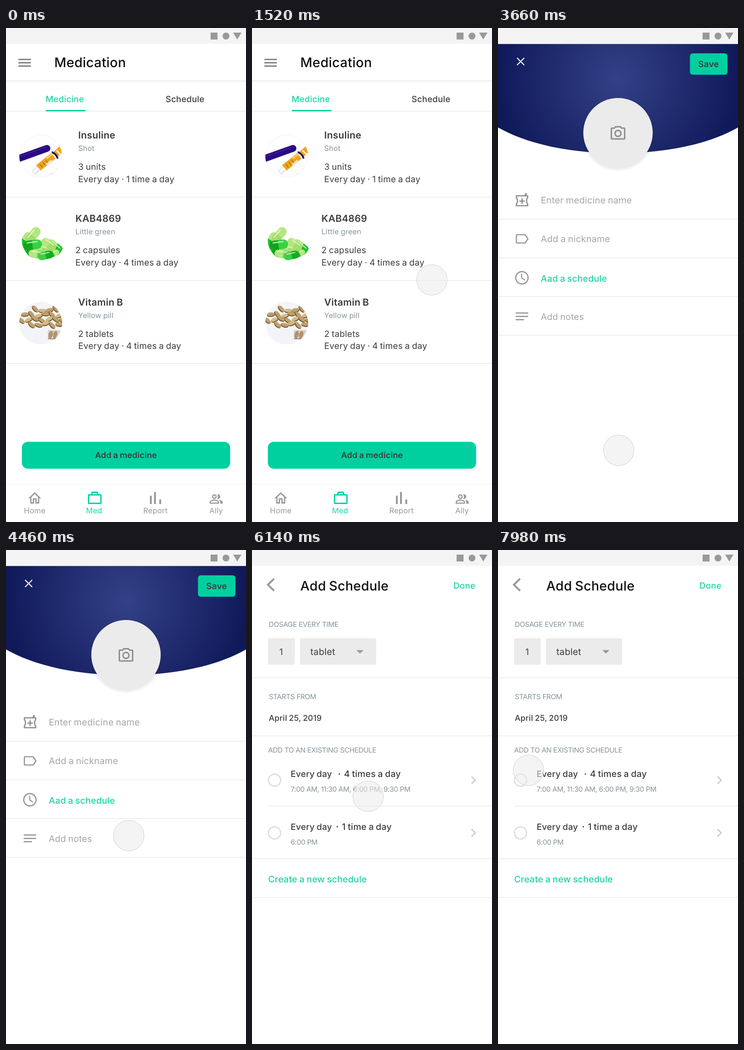
These frames come from a looping animation (522 by 1073 pixels, 8 s). An HTML page:

```html
<!DOCTYPE html>
<html lang="en">
<head>
<meta charset="utf-8">
<title>Medication</title>
<style>
  html, body { margin: 0; width: 100%; height: 100%; overflow: hidden; background: #fff; }
  svg { display: block; width: 522px; height: 1073px; }
  text {
    font-family: Inter, sans-serif; font-optical-sizing: none; text-rendering: geometricPrecision;
    letter-spacing: .012em; word-spacing: -.05em; white-space: pre;
  }
  .tight { letter-spacing: -.024em; word-spacing: 0; }
</style>
</head>
<body>
<svg id="stage" viewBox="0 0 522 1073"></svg>
<script>
const GREEN = '#00d0a0', TEAL = '#1bd3a6', INK = '#3c3c3e', SLATE = '#87939a', GREY = '#999', PALE = '#a5a5a5';

// Drawing helpers
const text = (x, y, size, str, fill = INK, weight = 400, extra = '') =>
  `<text x="${x}" y="${y}" font-size="${size}" fill="${fill}" font-weight="${weight}" ${extra}>${str}</text>`;
const middle = (x, y, size, str, fill, weight) => text(x, y, size, str, fill, weight, 'text-anchor="middle"');
const tight = (x, y, str) => text(x, y, 15.3, str, SLATE, 400, 'class="tight"');
const rect = (x, y, w, h, fill, r = 0) => `<rect x="${x}" y="${y}" width="${w}" height="${h}" rx="${r}" fill="${fill}"/>`;
const circle = (x, y, r, fill, extra = '') => `<circle cx="${x}" cy="${y}" r="${r}" fill="${fill}" ${extra}/>`;
const ring = (x, y, r, color, w) => circle(x, y, r, 'none', `stroke="${color}" stroke-width="${w}"`);
const stroke = (d, color, w, extra = '') => `<path d="${d}" fill="none" stroke="${color}" stroke-width="${w}" ${extra}/>`;
const fill = (d, color, extra = '') => `<path d="${d}" fill="${color}" ${extra}/>`;
const rule = (y, x = 0, color = '#e6e6e6') => rect(x, y - .6, 522 - x, 1.2, color);
const group = (id, body) => `<g id="${id}">${body}</g>`;
const clipped = (x, y, body) => {
  const id = `clip${y}`;
  return `<clipPath id="${id}"><circle cx="${x}" cy="${y}" r="46.5"/></clipPath><g clip-path="url(#${id})">${body}</g>`;
};

function penPicture() {
  return circle(75.5, 278.5, 46.5, '#fefefe') + ring(75.5, 278.5, 46, '#eee', .8) +
    stroke('M26 284L89 261.500', '#2a0a83', 15, 'stroke-linecap="round"') +
    stroke('M30 279L88 258', '#3d1f9c', 2) +
    stroke('M126 258L106 276', '#f2a516', 14) +
    stroke('M110 266l10 10', '#fff', 3) +
    stroke('M103 278L70 304', '#f2a516', 15) +
    stroke('M102 273L88 284', '#ffd25c', 3) +
    stroke('M101 270Q109 274 112 282', '#24106f', 4, 'stroke-linecap="round"') +
    stroke('M100 288L88 297', '#e9e4da', 5) +
    stroke('M74 296l5 7M80 291l5 7M86 286l5 7', '#9a6a12', 1.3) +
    stroke('M71 304L60 315', '#e4e4e8', 11) + stroke('M70 304L61 313', '#fff', 6) +
    stroke('M93 318l10-3M108 304l4 3', '#ddd', 1);
}

function capsulePicture() {
  const capsule = (x, y, angle, a, b, s = 1) =>
    `<g transform="translate(${x} ${y}) rotate(${angle}) scale(${s})">` +
    fill('M0-9H-9a9 9 0 0 0 0 18H0z', a) + fill('M0-9H9a9 9 0 0 1 0 18H0z', b) +
    stroke('M-10-5H9', '#e9ffe0', 2.5, 'stroke-linecap="round" opacity=".7"') + '</g>';
  const dark = '#19bf27', deep = '#10a51d', lime = '#b5e77f', leaf = '#a5dc6c';
  return capsule(43, 462, 120, lime, dark, 1.1) +
    capsule(59, 450, -50, leaf, lime, 1.1) +
    capsule(48, 480, 50, dark, deep, 1.1) +
    capsule(78, 481, 15, lime, leaf, 1.2) +
    capsule(106, 476, 40, lime, dark, 1.15) +
    capsule(93, 470, 35, lime, leaf) +
    capsule(67, 491, 8, lime, '#8bd95f') +
    capsule(104, 490, -25, dark, lime, .7) +
    capsule(58, 471, -8, deep, '#3bd042', 1.15) +
    capsule(86, 494, -12, '#3bd042', '#12ad20', .95);
}

function tabletPicture() {
  let body = circle(75.5, 641, 46.5, '#f3f4f7');
  for (let i = 0; i < 28; i++) {
    const row = Math.floor(i / 7), col = i % 7;
    const x = 34 + col * 15 + (row % 2) * 7, y = 612 + row * 10.5 + 2.5 * Math.sin(i * 2.3);
    if ((row === 0 && col < 2) || (row === 3 && (col < 1 || col > 5))) continue;
    const turn = `transform="translate(${x} ${y}) rotate(${12 + 38 * Math.sin(i * 4.1)})"`;
    body += `<g ${turn}><ellipse cy="1.8" rx="8.8" ry="4.2" fill="#75582f"/>` +
      `<ellipse rx="8.8" ry="3.8" fill="${i % 3 ? '#bfa06c' : '#d3ba8c'}"/></g>`;
  }
  return body + rect(91, 656, 27, 20, '#d9d4cf', 2) +
    [97, 107].map(x => `<ellipse cx="${x}" cy="666" rx="4.5" ry="8.5" transform="rotate(15 ${x} 666)" fill="#b3946a"/>`).join('') +
    stroke('M91 675H118', '#8c7250', 1.5);
}

function medicineRow(x, y, name, nick, dose, plan) {
  return text(x, y, 20.9, name, INK, 600) + text(x, y + 27, 16.1, nick, SLATE) +
    text(x, y + 68, 18.8, dose) + text(x, y + 94.5, 18.9, plan);
}

function listScreen() {
  const nav = (x, label, color) => middle(x, 1054, 16.5, label, color);
  return [68.3, 75.5, 82.7].map(y => rect(27, y - 1.4, 27, 2.8, '#7b7b7b')).join('') +
    text(105, 85, 28.7, 'Medication', '#111', 500) + rule(115.2, 0, '#dedede') +
    text(86, 161, 18.7, 'Medicine', TEAL, 500) + text(347, 161, 18.5, 'Schedule', INK, 500) +
    rule(180.6) + rect(86.5, 178, 86.5, 3, GREEN, 1.5) +
    clipped(75.5, 278.5, penPicture()) + clipped(81, 460, capsulePicture()) + clipped(75.5, 641, tabletPicture()) +
    medicineRow(157, 240, 'Insuline', 'Shot', '3 units', 'Every day · 1 time a day') +
    medicineRow(151, 421, 'KAB4869', 'Little green', '2 capsules', 'Every day · 4 times a day') +
    medicineRow(157, 602.5, 'Vitamin B', 'Yellow pill', '2 tablets', 'Every day · 4 times a day') +
    rule(367.4) + rule(548.5) + rule(728.5) +
    rect(34.5, 898.7, 453, 58.6, GREEN, 13) + middle(261, 933.5, 17.9, 'Add a medicine', INK, 600) +
    rule(991, 0, '#f0f0f0') +
    fill('M12 5.69l5 4.5V18h-2v-6H9v6H7v-7.81l5-4.5M12 3L2 12h3v8h6v-6h2v6h6v-8h3z', GREY, 'transform="translate(45.7 1004) scale(1.4 1.45)"') +
    stroke('M180.500 1014H205.500a1 1 0 0 1 1 1V1031.500a1 1 0 0 1-1 1H180.500a1 1 0 0 1-1-1V1015a1 1 0 0 1 1-1zM187 1014V1009.500a1 1 0 0 1 1-1H198a1 1 0 0 1 1 1V1014', GREEN, 2.8) +
    rect(313, 1016, 4, 18, GREY) + rect(322, 1008, 4, 26, GREY) + rect(333.5, 1024, 4, 10, GREY) +
    fill('M16.67 13.13C18.04 14.06 19 15.32 19 17v3h4v-3c0-2.18-3.57-3.47-6.33-3.87zM15 12c2.21 0 4-1.79 4-4s-1.79-4-4-4c-.47 0-.91.1-1.33.24C14.5 5.27 15 6.58 15 8s-.5 2.73-1.33 3.76c.42.14.86.24 1.33.24zM9 12c2.21 0 4-1.79 4-4s-1.79-4-4-4-4 1.79-4 4 1.79 4 4 4zm0-6c1.1 0 2 .9 2 2s-.9 2-2 2-2-.9-2-2 .9-2 2-2zm0 7c-2.67 0-8 1.34-8 4v3h16v-3c0-2.66-5.33-4-8-4zm6 5H3v-.99C3.2 16.29 6.3 15 9 15s5.8 1.29 6 2v1z', GREY, 'transform="translate(441.7 1007.6) scale(1.28)"') +
    nav(62.5, 'Home', GREY) + nav(191.5, 'Med', TEAL) + nav(325, 'Report', GREY) + nav(457, 'Ally', GREY);
}

function formScreen() {
  return `<radialGradient id="night" gradientUnits="userSpaceOnUse" cx="261" cy="110" r="260">
      <stop offset="0" stop-color="#334186"/><stop offset="1" stop-color="#101a5b"/></radialGradient>
    <radialGradient id="shade"><stop offset=".88" stop-color="#000" stop-opacity=".1"/><stop offset="1" stop-color="#000" stop-opacity="0"/></radialGradient>` +
    fill('M0 34.500H522V216C455 254 360 272 261 272S67 254 0 216z', 'url(#night)') +
    circle(261, 231, 81, 'url(#shade)') + circle(261, 227.5, 75.5, '#ebebeb') +
    stroke('M248 217.500H253L256 214.500H266L269 217.500H274a1.500 1.500 0 0 1 1.500 1.500V239.500a1.500 1.500 0 0 1-1.500 1.500H248a1.500 1.500 0 0 1-1.500-1.500V219a1.500 1.500 0 0 1 1.500-1.500z', '#8e8e8e', 3) +
    ring(261, 229, 6.5, '#8e8e8e', 3) +
    stroke('M41.500 65L57 80.500M57 65L41.500 80.500', '#fff', 2.2) +
    rect(417.5, 55, 81.5, 46.5, GREEN, 6) + middle(458, 85, 18.8, 'Save', INK, 600) +
    stroke('M40 364.500H64.500V368Q59.500 375 64.500 383V386H40V383Q45 375 40 368zM52.300 370V382M46.300 376H58.300', '#8c8c8c', 2.7) +
    stroke('M58.500 364L62 359', '#8c8c8c', 3.5) +
    stroke('M42 449H57.500q1.500 0 2.300 1L65 458L59.800 466q-.8 1-2.300 1H42q-2 0-2-2V451q0-2 2-2z', GREY, 2.7) +
    ring(52, 542.5, 13.4, GREY, 2.7) + stroke('M51.500 534V543L58.500 547.500', GREY, 2.3) +
    [[619, 27], [626.5, 27], [633.5, 18]].map(([y, w]) => rect(38.5, y - 1.3, w, 2.7, GREY)).join('') +
    text(93, 381, 19.7, 'Enter medicine name', PALE) + text(93, 465, 19.7, 'Add a nickname', PALE) +
    text(93, 551, 19.4, 'Aad a schedule', TEAL, 500) + text(93, 633.5, 19.3, 'Add notes', PALE) +
    [415.4, 499.4, 583.4, 667.4].map(y => rule(y)).join('');
}

function scheduleRow(y, dotX, planX, plan, times) {
  return ring(49, y, 13.2, '#dcdcdc', 2.7) +
    text(84, y - 7, 18.8, 'Every day', INK, 500) + circle(dotX, y - 13.5, 1.5, INK) +
    text(planX, y - 7, 19.4, plan, INK, 500) + tight(84, y + 25, times) +
    stroke(`M477.500 ${y - 8}l8 8l-8 8`, '#cfcfcf', 3);
}

function scheduleScreen() {
  return stroke('M48 62.500L34.500 75.500L48 88.500', GREY, 4) +
    text(105, 88, 28.4, 'Add Schedule', '#111', 500) + text(438, 84, 18.7, 'Done', TEAL, 500) +
    tight(36.5, 167, 'DOSAGE EVERY TIME') +
    rect(35, 191.5, 58, 58, '#ebebeb', 4) + rect(104.5, 191.5, 165.5, 58, '#ebebeb', 4) +
    middle(63.5, 227.5, 19, '1') + text(127, 227.5, 19.8, 'tablet') + fill('M227 217.500H242.500L234.700 225z', GREY) +
    rule(277.6) + tight(36.5, 323.5, 'STARTS FROM') + text(36.5, 371, 17.4, 'April 25, 2019', INK, 500) +
    rule(403.6) + tight(35, 439.5, 'ADD TO AN EXISTING SCHEDULE') +
    scheduleRow(500, 190, 200, '4 times a day', '7:00 AM, 11:30 AM, 6:00 PM, 9:30 PM') + rule(556, 35) +
    scheduleRow(614.5, 185.5, 195.5, '1 time a day', '6:00 PM') +
    rule(670.6) + text(35, 722, 19.5, 'Create a new schedule', TEAL, 500) + rule(754.6);
}

const stage = document.getElementById('stage');
stage.innerHTML = rect(0, 0, 522, 1073, '#fff') +
  group('list', listScreen()) + group('form', formScreen()) + group('schedule', scheduleScreen()) +
  rect(0, 0, 522, 34.5, '#f4f4f4') + rect(445, 10, 15, 15, GREY) + circle(478.5, 17.5, 7.5, GREY) + fill('M494 10H512L503 25z', GREY) +
  group('pointer', '<circle id="disc"/><circle id="gloss" fill="none" stroke="#fff" stroke-opacity=".7"/>');

// Pointer path: [time, x, y]; equal neighbours are rests
const path = [
  [0, 482, -36], [400, 482, -36], [1120, 430.5, 390], [1260, 430.5, 390], [1520, 391.5, 546.5],
  [2080, 266, 891.5], [2260, 262.5, 919], [3640, 262.5, 919], [3660, 262.5, 917.5], [4060, 269.5, 765],
  [4460, 267, 620.5], [4980, 250.5, 536.5], [6120, 250.5, 536.5], [6140, 252.5, 535], [6360, 265.5, 526.5],
  [6680, 265.5, 526.5], [6820, 242.5, 487.5], [7360, 242.5, 487.5], [7980, 66.5, 478.5], [8000, 66.5, 478.5],
];
const slope = (i, k) => path[i + 1] && path[i] ? (path[i + 1][k] - path[i][k]) / (path[i + 1][0] - path[i][0]) : 0;
const tangent = (i, k) => {
  const a = slope(i - 1, k), b = slope(i, k);
  return a * b > 0 ? 2 * a * b / (a + b) : 0;
};

// Monotone cubic interpolation along the path
function position(time, k) {
  const i = path.findIndex((p, n) => n === path.length - 2 || time < path[n + 1][0]);
  const span = path[i + 1][0] - path[i][0], u = (time - path[i][0]) / span, v = 1 - u;
  return path[i][k] * v * v * (1 + 2 * u) + path[i + 1][k] * u * u * (3 - 2 * u) +
    span * u * v * (tangent(i, k) * v - tangent(i + 1, k) * u);
}

const part = id => document.getElementById(id);
const set = (el, attrs) => Object.entries(attrs).forEach(([k, v]) => el.setAttribute(k, v));

function draw(now) {
  const time = now % 8000;
  const screen = time < 2700 ? 'list' : time < 5120 ? 'form' : 'schedule';
  for (const id of ['list', 'form', 'schedule']) part(id).style.display = id === screen ? '' : 'none';
  const pressed = time >= 2580 && time < 2700;
  set(part('pointer'), { transform: `translate(${position(time, 1)} ${position(time, 2)})` });
  set(part('disc'), {
    r: pressed ? 31 : 33,
    fill: pressed ? 'rgba(222,222,222,.72)' : 'rgba(236,236,236,.55)',
    stroke: pressed ? '#a4a9a8' : '#c2c2c2',
  });
  set(part('gloss'), { r: pressed ? 30 : 32 });
  requestAnimationFrame(draw);
}
draw(0);
</script>
</body>
</html>
```
